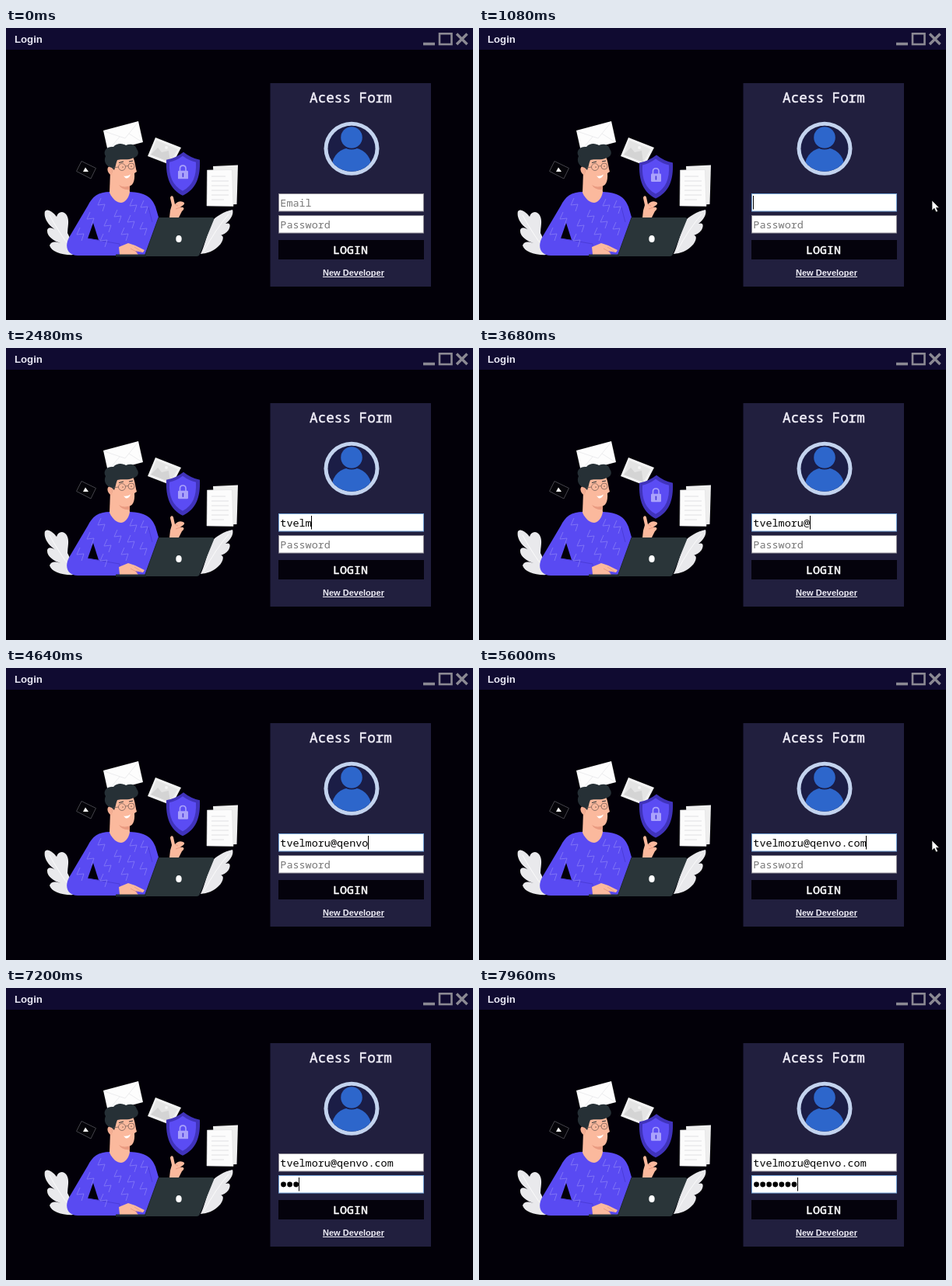
Write an HTML page that moves like this. It is 600 by 376 pixels and loops after 8 s.

```html
<!DOCTYPE html>
<html lang="en">
<head>
<meta charset="utf-8">
<title>Login</title>
<style>
  html, body { margin: 0; width: 100%; height: 100%; overflow: hidden; background: #020008; }
  svg { display: block; width: 600px; height: 376px; }
  .mono { font-family: "Noto Sans Mono", "DejaVu Sans Mono", monospace; font-size: 13.47px; }
  .medium { stroke-width: .45; }
  .sans { font-family: "Liberation Sans", Arial, sans-serif; font-weight: 700; }
  .mid { text-anchor: middle; }
  .hint { fill: #777; }
  .field { fill: #fff; stroke: #8a8892; }
  .field.focus { stroke: #719fd3; }
</style>
</head>
<body>
<svg viewBox="0 0 600 376">
  <defs>
    <clipPath id="portrait"><ellipse cx="444" cy="155.300" rx="30.500" ry="29.500"/></clipPath>
  </defs>
  <rect width="600" height="376" fill="#020008"/>

  <!-- Title bar -->
  <rect width="600" height="28" fill="#100b31"/>
  <text class="sans" x="11" y="19" font-size="13.2" fill="#e8e7f4">Login</text>
  <g fill="none" stroke="#8b8993" stroke-width="2.600">
    <path d="M536 20.500H551" stroke-width="3.600"/>
    <rect x="557" y="7.300" width="15.500" height="13.700"/>
    <path d="M579 7.500L592.500 21M592.500 7.500L579 21" stroke-width="3.400"/>
  </g>

  <!-- Floating papers -->
  <path d="M125 132L170 120L176 147L131 159Z" fill="#fdfdfd"/>
  <path d="M126 133L153 142L170 121M131 158L146 140M175 147L158 136" fill="none" stroke="#e8e8ea" stroke-width=".8"/>
  <path d="M192 141L225 154L213 177L182 165Z" fill="#f2f2f2"/>
  <path d="M193 144.500L220.500 156L211 173L186 163Z" fill="#e4e4e4"/>
  <path d="M186 163L195 154L200 160L209 158L211 173Z" fill="#d4d4d4"/>
  <circle cx="206" cy="154" r="2" fill="#f4f4f4"/>
  <path d="M266 178L298 176.500L296.500 227L268 228Z" fill="#eee"/>
  <path d="M258.500 183L290.500 182.500L292 229.500L258 229Z" fill="#fcfcfc" stroke="#dedee0" stroke-width=".6"/>
  <path d="M264 191H282M264 197H286M264 203H286M264 209H286M264 215H286M264 221H280" stroke="#dfdfe2"/>
  <path d="M97 171.500L115.500 180.500L109 194L90.500 184.500Z" fill="#050409" stroke="#44434a"/>
  <path d="M102 179.500L106 185H99Z" fill="#fff"/>

  <!-- Leaves -->
  <g fill="#e9e9ec">
    <path d="M88 292C72 293 58 288 56 280C58 274 65 275 70 277C61 274 52 268 53 260C55 255 60 258 64 260C54 254 48 244 50 236C53 232 60 236 65 243C67 236 74 235 78 241C82 248 79 256 79 264C83 272 87 281 88 292Z"/>
    <path d="M250 291C256 278 259 263 264 250C268 243 281 236 291 234C293 240 288 248 282 252C288 250 289 254 286 260C283 264 279 266 276 267C281 267 279 276 273 281C266 288 258 290 250 291Z"/>
  </g>
  <path d="M56 241Q66 260 86 288M286 240Q270 258 254 288" fill="none" stroke="#fff" stroke-width=".8"/>

  <!-- Person -->
  <path d="M134 211C118 211 111 217 105 229L82 268C74 281 79 293 92 293H179L197 247L192 230C187 217 178 212 159 211Z" fill="#594af2"/>
  <path d="M112 251L105 271L119 273Z" fill="#020008"/>
  <path d="M105 271L146 278V293M183 231L188 250" fill="none" stroke="#4a3cd8"/>
  <path id="zigzags" fill="none" stroke="#8378f7" stroke-width=".9"/>
  <path d="M134 185L133 212C137 221 143 225 148 225C154 224 158 218 159 211L158 200Z" fill="#fbb99d"/>
  <path d="M145 202Q153 207 159 202V208Q149 209 145 202Z" fill="#e99a80"/>
  <path d="M137 167L163 166C166 172 166 178 168 185L165 187C166 199 162 205 154 204C145 203 138 198 136 188Z" fill="#fbb99d"/>
  <path d="M137 180C130 174 127 186 136 190Z" fill="#f5ae93"/>
  <path d="M136 180C128 178 125 171 128 165C124 159 129 152 138 153C143 147 151 149 154 151C161 148 167 151 168 156C172 161 169 166 164 167C157 171 148 168 143 170C141 174 141 179 139 183Z" fill="#263036"/>
  <path d="M145 173.500L151 172M158 172L163 171" stroke="#263036"/>
  <g fill="none" stroke="#6e5a52" stroke-width=".7">
    <circle cx="149" cy="179" r="4.500"/><circle cx="161" cy="178" r="4"/>
    <path d="M138 180L144.500 179M153.500 178L157 177.500"/>
  </g>
  <circle cx="150" cy="179" r=".6"/><circle cx="161" cy="178" r=".6"/>
  <path d="M151 190.500Q156 191.500 160 188.500Q158 194 154 193.500Z" fill="#fff"/>

  <!-- Hands and laptop -->
  <path d="M210 244L211 235L213 228L211 219C211 216 214 215 215 218L217 227C222 222 226 223 229 225C230 228 225 229 224 231C229 230 230 233 226 236L222 244Z" fill="#fbb99d"/>
  <path d="M217 227L221 229M218 233L224 231" stroke="#e58f77" stroke-width=".8"/>
  <path d="M145 282L157 277L166 280L178 286L176 289L166 287L170 292H146Z" fill="#fbb99d"/>
  <path d="M160 284L169 289M165 282L174 288" stroke="#e58f77" stroke-width=".7"/>
  <path d="M196 244H265Q268 244 267 247L249 291Q248 294 245 294H178Z" fill="#2a3539"/>
  <path d="M141 291.500H180V294.500H141Z" fill="#222c31"/>
  <path d="M196 244L178 294" stroke="#1d272b"/>
  <ellipse cx="222" cy="271.500" rx="3.700" ry="4.500" fill="#fff"/>

  <g id="shield">
    <path d="M228 161Q238 169 249 171C250 194 244 209 227 217C211 209 205 194 206 171Q218 169 228 161Z" fill="#4033bb"/>
    <path d="M227 166Q235 172 244 174C245 192 240 204 227 211C214 204 209 192 210 174Q219 172 227 166Z" fill="#5b4cf4"/>
    <path d="M223.500 186V182C223.500 177 231 177 231 182V186" fill="none" stroke="#aaa2fb" stroke-width="1.600"/>
    <rect x="221" y="185" width="13" height="10.500" rx="1.200" fill="#aaa2fb"/>
    <path d="M227.400 188.500V192.500" stroke="#4939d8" stroke-width="1.600" stroke-linecap="round"/>
  </g>

  <!-- Form -->
  <rect x="339.500" y="71" width="206.500" height="262" fill="#211f3e"/>
  <text class="mono mid medium" x="443" y="96" fill="#f2f0fa" stroke="#f2f0fa" style="font-size:17.650px">Acess Form</text>
  <ellipse cx="444" cy="155.300" rx="35.500" ry="34.500" fill="#c3d3ee"/>
  <ellipse cx="444" cy="155.300" rx="30.500" ry="29.500" fill="#1b1d46"/>
  <g clip-path="url(#portrait)" fill="#2d66cb">
    <ellipse cx="444" cy="177" rx="25" ry="23"/>
    <circle cx="444" cy="141" r="15.500" fill="#1b1d46"/>
    <circle cx="444" cy="141" r="13.800"/>
  </g>
  <rect id="emailBox" class="field" x="350.500" y="213.500" width="186" height="22.500"/>
  <rect id="passBox" class="field" x="350.500" y="241.500" width="186" height="22.500"/>
  <text id="email" class="mono" x="352.300" y="229.500"></text>
  <text id="passHint" class="mono hint" x="352.300" y="257.500">Password</text>
  <path id="dots" stroke="#000" stroke-width="6.800" stroke-linecap="round" stroke-dasharray="0 8.080"/>
  <path id="caret" stroke="#000"/>
  <rect x="350" y="273" width="187" height="25" fill="#04020c"/>
  <text class="mono mid medium" x="442.500" y="291" fill="#fff" stroke="#fff" style="font-size:15px">LOGIN</text>
  <text class="sans mid" x="446.500" y="319" font-size="11" fill="#f0eff8">New Developer</text>
  <path d="M407 320.500H486" stroke="#f0eff8"/>

  <g id="pointer">
    <path id="arrow" d="M0 0V13L3 10.200L5.200 15L7.500 14L5.400 9.400H9.300Z" fill="#fff" stroke="#111" stroke-width=".7"/>
    <path id="beam" d="M-3 -8H3M0 -8V8M-3 8H3" fill="none" stroke="#111"/>
  </g>
</svg>
<script>
const LOOP = 8000, ADVANCE = 8.08, TEXT_X = 352.5;
const ADDRESS = "tvelmoru@qenvo.com";
const EMAIL_FOCUS = 640, PASS_FOCUS = 6040;
const emailKeys = [1640, 1860, 2060, 2240, 2420, 2760, 3020, 3300, 3560,
                   3800, 4000, 4180, 4360, 4560, 4800, 4960, 5120, 5300];
const passKeys = [6700, 6920, 7120, 7300, 7480, 7680, 7860];
// Pointer visits as [time, x, y]; typing hides it.
const visits = [
  [[160, 582, 222], [580, 470, 226], [700, 470, 226], [960, 582, 222], [1640, 582, 222]],
  [[5600, 582, 222], [5960, 470, 253], [6100, 470, 253], [6360, 582, 222], [6700, 582, 222]]
];

const $ = id => document.getElementById(id);
const show = (id, on) => $(id).setAttribute("visibility", on ? "visible" : "hidden");
const typed = (keys, t) => keys.filter(k => k <= t).length;
const smooth = u => u * u * (3 - 2 * u);

const marks = [122, 219, 143, 234, 163, 220, 108, 237, 130, 246, 160, 241, 95, 257,
               125, 265, 177, 222, 152, 257, 176, 250];
let zigzags = "";
for (let i = 0; i < marks.length; i += 2)
  zigzags += `M${marks[i]} ${marks[i + 1]}l-4 9 9 -1 -3 9`;
$("zigzags").setAttribute("d", zigzags);

function drawFields(t) {
  const onEmail = t >= EMAIL_FOCUS && t < PASS_FOCUS, onPass = t >= PASS_FOCUS;
  const letters = typed(emailKeys, t), secrets = typed(passKeys, t);
  $("emailBox").classList.toggle("focus", onEmail);
  $("passBox").classList.toggle("focus", onPass);
  $("email").textContent = t < EMAIL_FOCUS ? "Email" : ADDRESS.slice(0, letters);
  $("email").classList.toggle("hint", t < EMAIL_FOCUS);
  show("passHint", !onPass);
  show("dots", secrets > 0);
  $("dots").setAttribute("d", `M356.5 253h${Math.max(0, secrets - 1) * ADVANCE + .1}`);

  const count = onPass ? secrets : letters;
  const keys = onPass ? passKeys : emailKeys;
  const lastInput = count ? keys[count - 1] : onPass ? PASS_FOCUS : EMAIL_FOCUS;
  show("caret", (onEmail || onPass) && (t - lastInput) % 1060 < 530);
  const x = Math.floor(TEXT_X + count * ADVANCE) + .5;
  $("caret").setAttribute("d", `M${x} ${onPass ? 244 : 216}v17.5`);
}

function drawPointer(t) {
  const visit = visits.find(v => t >= v[0][0] && t < v[v.length - 1][0]);
  show("arrow", false);
  show("beam", false);
  if (!visit) return;
  const i = visit.findIndex(p => p[0] > t);
  const [t0, x0, y0] = visit[i - 1], [t1, x1, y1] = visit[i];
  const u = smooth((t - t0) / (t1 - t0));
  const x = x0 + (x1 - x0) * u, y = y0 + (y1 - y0) * u;
  show(x > 350 && x < 537 ? "beam" : "arrow", true);
  $("pointer").setAttribute("transform", `translate(${x} ${y})`);
}

function frame(now) {
  const t = now % LOOP;
  const bob = -2 * Math.cos((t - 2480) / 2400 * 2 * Math.PI);
  $("shield").setAttribute("transform", `translate(0 ${bob + .8})`);
  drawFields(t);
  drawPointer(t);
  requestAnimationFrame(frame);
}
frame(0);
</script>
</body>
</html>
```
